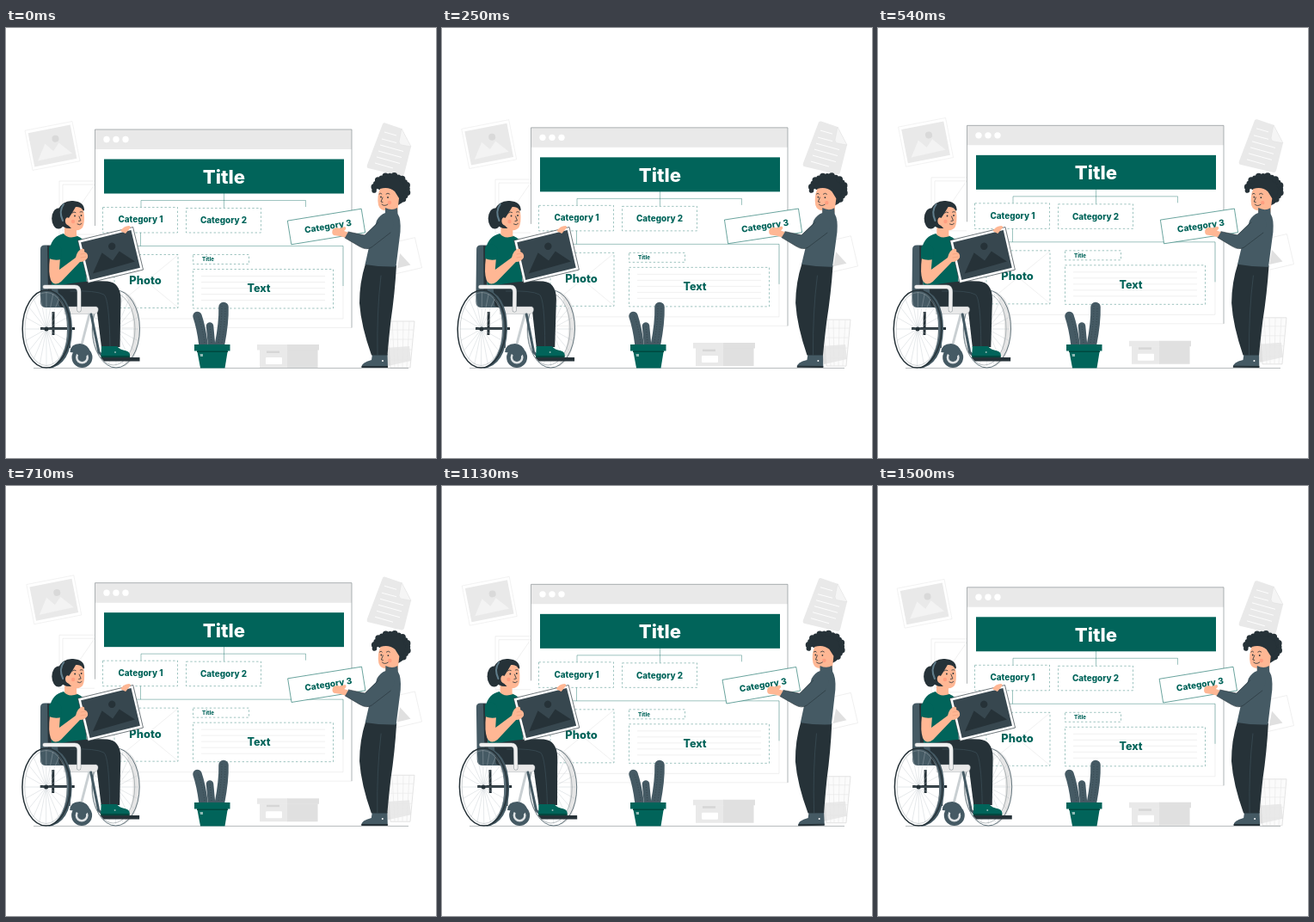
Write an HTML page that moves like this. It is 500x500 px and loops after 1.54 s.

```html
<!DOCTYPE html>
<html lang="en">
<head>
<meta charset="utf-8">
<style>
html, body { margin: 0; height: 100%; overflow: hidden; background: #fff; }
svg { display: block; width: 100vw; height: 100vh; }
text { font-family: Inter, "Open Sans", sans-serif; font-weight: 800; text-anchor: middle; fill: #01645a; }
.green { fill: #01645a; }
.dark { fill: #263238; }
.slate { fill: #455a64; }
.skin { fill: #ffb794; }
.white { fill: #fff; }
.pale { fill: #e9e9e9; }
.grey { fill: #e0e0e0; }
.line { fill: none; stroke: #263238; stroke-width: .5; }
.thin { fill: none; stroke: #e6e6e6; stroke-width: .6; }
.teal { fill: none; stroke: #01645a; stroke-width: .55; stroke-opacity: .7; }
.dash { stroke-dasharray: 2.4 2.4; }
.round { fill: none; stroke-linecap: round; stroke-linejoin: round; }
</style>
</head>
<body>
<svg viewBox="0 0 500 500">
  <g id="backdrop">
    <path class="thin" d="M103 178H62V240H103M66 182H103M66 182V236M66 236L103 182"/>
    <g transform="translate(450 267) rotate(-13)">
      <rect class="thin" x="-23" y="-17" width="53" height="36"/>
      <path class="grey" d="M2 13L9-3 18 13Z"/>
    </g>
    <g id="photo">
      <g transform="translate(54 137) rotate(-11)">
        <rect x="-28" y="-23.5" width="56" height="47" fill="#fff" stroke="#ebebeb" stroke-width=".6"/>
        <rect class="pale" x="-25" y="-20" width="50" height="40"/>
        <path d="M-20 14L-8-4 0 6 8-2 21 13Z" fill="#f3f3f3"/>
        <circle cx="5" cy="-7.5" r="4" fill="#d9d9d9"/>
      </g>
    </g>
    <g id="sheet">
      <path class="pale" d="M438 111.500Q439 110 441 110.500L460 117 471 138 463 170Q462 173 459 172L421 163Q419 162 420 159Z"/>
      <path d="M460 117L457 132Q457 135 460 136L471 138Z" fill="#f5f5f5" stroke="#dedede" stroke-width=".5"/>
      <path stroke="#fff" stroke-width=".9" fill="none" d="M440 121L454 125M437 129L454 133.500M435 136L462 143.500M433 143L460 150.500M431 150L458 157.500M429 157L450 163"/>
    </g>
  </g>

  <g id="page">
    <path class="white" d="M103.500 118H402V348.500H103.500Z"/>
    <path class="thin" d="M103.500 338H392M103.500 348.500H402M392 253.500V338"/>
    <path class="pale" d="M103.500 118H402V141H103.500Z"/>
    <path d="M103.500 230V118H402V348.500" fill="none" stroke="#8b9295" stroke-width=".7"/>
    <g class="white"><circle cx="117" cy="129.500" r="3.700"/><circle cx="128" cy="129.500" r="3.700"/><circle cx="139" cy="129.500" r="3.700"/></g>
    <rect class="green" x="114" y="152.500" width="279" height="40"/>
    <path class="teal" d="M253.500 192V209M157 208V200.500H348.500V208M156.500 238V253.500M112 253.500H392V300"/>
    <path class="thin" d="M126 325L200 264M126 264L200 325M227 288.500H371M227 295.500H371M227 302.500H371M227 309.500H371M227 316.500H371"/>
    <path class="teal dash" d="M112.500 208.500H199.500V238H112.500ZM209.500 209.500H296.500V238H209.500ZM126 263.500H200V325.500H126ZM217.500 263.500H282.500V274.500H217.500ZM217.500 280.500H380.500V326H217.500Z"/>
    <text x="253.500" y="181" font-size="22.100" style="fill:#fff">Title</text>
    <text x="156.500" y="226.500" font-size="9.900">Category 1</text>
    <text x="253" y="227.300" font-size="9.900">Category 2</text>
    <text x="162" y="298" font-size="12.900">Photo</text>
    <text x="294" y="307.500" font-size="12.500">Text</text>
    <text x="235" y="271.500" font-size="6.200">Title</text>
  </g>

  <g id="props">
    <path class="pale" d="M295 374H328V395H295Z"/>
    <path class="grey" d="M327 374H362.500V395H327Z"/>
    <path class="pale" d="M292 368H328V374.500H292Z"/>
    <path class="grey" d="M327 368H364V374.500H327Z"/>
    <path d="M303 375.500H318V378H303Z" fill="#d6d6d6"/>
    <rect class="white" x="302" y="383" width="19" height="8" rx="1"/>
    <path class="grey" d="M440 372L469 370 471 387 444 393Z"/>
    <path d="M443 341H475L470 395H447Z" fill="#f5f5f5" fill-opacity=".4" stroke="#dedede" stroke-width=".8"/>
    <path class="thin" d="M449 341L452 395M455 341L456 395M462 341L461 395M469 341L466 395M443 351H474M444 362H473M445 374H472M446 386H471"/>
  </g>
  <path class="line" stroke-opacity=".65" d="M32 395.500H468"/>

  <g id="plant">
    <g class="round" stroke="#455a64">
      <path d="M229.500 368Q227 348 222.500 335" stroke-width="10.500"/>
      <path d="M248.500 368Q253.500 342 253 324.500" stroke-width="11.500"/>
      <path d="M239 368L237 346.500" stroke-width="8.500"/>
    </g>
    <path class="line" stroke-dasharray="1 2" d="M231 366Q228 346 223 334M247 366Q251 340 251 322M251 366Q255 342 255 324M239 366L237 345"/>
    <path class="green" d="M222 374H258L254.500 395.500H226Z"/>
    <path class="green" d="M219 368H260.500V375.500H219Z"/>
    <path d="M222 375.500H258V377H222Z" fill="#00483f"/>
    <path d="M225.500 379H229V382H226Z" fill="#8fb9b4"/>
  </g>

  <g id="woman">
    <g id="farWheel"></g>
    <path class="slate" d="M40 257Q40 252.500 45 252.500H52V300H67V325H46Q40 325 40 318Z"/>
    <path class="dark" d="M48 253Q53 253 53 260V305H49Z"/>
    <path class="dark" d="M40 348H80V351H40ZM53.500 330H56.500V357H53.500ZM72 332H75V372H72Z"/>

    <path class="skin" d="M68 229H82V241Q88 245 86 249L68 248Z"/>
    <path class="green" d="M67 239Q72 246 83 242Q91 245 92 252L94 299H53L52 270Q49 265 51 256Q54 242 67 239Z"/>
    <path class="dark" d="M60 300Q90 293 118 294.500Q133 296 133.500 315L132.500 371H111L106 331Q80 333 62 323Z"/>
    <path d="M75 306Q105 305 114 310Q120 315 121 370" class="round" stroke="#455a64" stroke-width=".5"/>

    <path class="pale" d="M68 324H105Q108 325 107 329 106 332.500 103 332.500H68Z" stroke="#9aa3a7" stroke-width=".4"/>
    <path class="round" stroke="#8b9599" stroke-width="5" d="M45 301H80Q85 301 85 307V328"/>
    <path class="round" stroke="#efefef" stroke-width="4" d="M45 301H80Q85 301 85 307V328"/>
    <path class="round" stroke="#c9cfd2" stroke-width="3" d="M97 333L87 372"/>
    <path class="round" stroke="#455a64" stroke-width="3" d="M99 333L108 377 116 385H153"/>
    <path class="dark" d="M110 383H155.500V387.500H114Z"/>
    <path class="green" d="M111 370H129Q132 374 140 375.500 145 377 144 382H110.500Z"/>
    <path d="M110.500 381H144V383H110.500Z" fill="#00483f"/>
    <circle cx="127" cy="377" r="1" fill="#8fb9b4"/>

    <circle class="slate" cx="88.500" cy="383" r="12"/>
    <circle cx="88.500" cy="383" r="7.500" fill="#dfe3e5"/>
    <circle class="slate" cx="88.500" cy="383" r="5"/>
    <path class="slate" d="M74.500 377Q75 367 86 367 96 368 98 377L91 384H86Q84 377 74.500 377Z"/>
    <g id="nearWheel"></g>

    <ellipse class="dark" cx="61" cy="221.500" rx="7.800" ry="12"/>
    <path class="dark" d="M60 212Q66 200 78 201 91 202 91 212L83 216 76 233Q66 234 62 226Z"/>
    <path class="skin" d="M73 221Q77 215 81 208Q88 207 90.500 214Q92 226 89 232Q85 237 77 234L73 230Q68 228 69 223 70 219 73 221Z"/>
    <path class="round" stroke="#607d8b" stroke-width="2" d="M67 205Q61 213 66 224"/>
    <path class="round" stroke="#263238" stroke-width=".8" d="M77 215Q79 213 81 214.500M86 214Q88 213 89 214M83 228Q86 230 88 227.500M85 219L87 224 84.500 224.500"/>
    <circle class="dark" cx="80" cy="218.500" r=".9"/><circle class="dark" cx="87.500" cy="218" r=".9"/>
    <circle cx="78" cy="225" r="2.200" fill="#ff9e80"/>

    <g transform="translate(121.500 264) rotate(-13.500)">
      <rect x="-33" y="-25.500" width="66" height="51" fill="#fff" stroke="#263238" stroke-width=".6"/>
      <rect x="-30" y="-22.500" width="60" height="45" fill="#37474f"/>
      <path class="dark" d="M-25 16L-9-5 1 7 11-2 26 14Z"/>
      <circle class="dark" cx="4" cy="-9.500" r="4.200"/>
    </g>
    <path class="skin" d="M133 236Q137 230 143 230 146 231 144 233L139 239Z"/>
    <path class="skin" d="M51 267H63L62 281 81 267Q83 258 89 256.500 92 257 91 260 96 262 95 267 92 272 86 272L64 295Q56 301 52 293 49 285 51 267Z"/>
    <path class="green" d="M50 255Q58 247 64 256L64.500 269Q57 271 50 268Z"/>
    <path class="round" stroke="#eb9d7b" stroke-width=".6" d="M87 263L93 262M87 267L93 266"/>
  </g>

  <g id="man">
    <path class="slate" d="M426 379H443.500L444 394.500H413.500Q413 389 425 386Z"/>
    <path class="dark" d="M413.500 393H444V395H413.500Z"/>
    <circle class="white" cx="438" cy="387" r="1"/>
    <path class="dark" d="M418 274L454 276Q452 310 447.500 340 445 362 443.500 380.500H425Q413 347 411 320 411 296 418 274Z"/>
    <path class="round" stroke="#455a64" stroke-width=".5" d="M436 288Q431 330 432 380"/>
    <g id="curls" class="dark"></g>
    <path class="skin" d="M435 187Q445 184 452 190L457 198 455 215H441V212Q435 212 433 206 431 196 435 187Z"/>
    <path class="round" stroke="#263238" stroke-width=".8" d="M434 193Q436 191 437 193M442 193Q444 191 446 193M437 205Q440 208 444 205M438 197L436 202 438 202.500"/>
    <circle class="dark" cx="436" cy="196.500" r=".9"/><circle class="dark" cx="444" cy="197" r=".9"/>
    <circle cx="446" cy="203" r="2.200" fill="#ff9e80"/>
    <path class="slate" d="M441 209Q449 213 455 209L455.500 216Q459.500 222 458.500 237L453.500 277.500Q435 278 417.500 275L422 255 431 224Q435 217 441 215Z"/>

    <g transform="translate(372.500 231) rotate(-9.200)">
      <rect x="-43.500" y="-14" width="87" height="28" fill="#fff" stroke="#01645a" stroke-width=".55"/>
      <text x="2" y="3.500" font-size="10.100">Category 3</text>
    </g>
    <path class="skin" d="M380 234Q384 231 388 233L394 231Q397 233 393 236L402 239 399 245 388 242 381 241Q378 239 380 234Z"/>
    <path class="slate" d="M398 237L417 241 432 226Q440 216 449 222 454 229 446 238L424 256Q418 258 411 254L394 244Z"/>
    <path class="round" stroke="#263238" stroke-width=".6" d="M398 237L417 241 433 226M394 244L411 254Q419 259 425 255L447 238"/>
  </g>
</svg>
<script>
const PERIOD = 1540;
const el = id => document.getElementById(id);
const move = (id, transform) => el(id).setAttribute('transform', transform);

const ring = (cx, rx, ry, color, width) =>
  `<ellipse cx="${cx}" cy="350" rx="${rx}" ry="${ry}" fill="none" stroke="${color}" stroke-width="${width}"/>`;

function spokes(cx, rx, ry) {
  let d = '';
  for (let i = 0; i < 20; i++) {
    const a = i * Math.PI / 10;
    d += `M${cx} 350L${cx + rx * Math.cos(a)} ${350 + ry * Math.sin(a)}`;
  }
  return `<path d="${d}" fill="none" stroke="#b8c0c4" stroke-width=".35"/>`;
}

el('farWheel').innerHTML =
  '<path d="M134 305Q156 312 156 350 155 388 134 395 148 380 148 350 148 320 134 305Z" fill="#e6e6e6"/>' +
  spokes(128, 26, 43) + ring(128, 27.5, 45, '#455a64', .8) + ring(125, 25, 42, '#8b9599', .6);

el('nearWheel').innerHTML = spokes(47, 25, 43) +
  '<path class="slate" d="M49 304Q76 307 77 350 76 393 49 396 71 386 71 350 71 313 49 304Z"/>' +
  ring(47, 27.8, 45, '#263238', 1.5) + ring(47, 25, 42.5, '#9aa3a7', .5) +
  '<circle class="dark" cx="47" cy="350" r="2.500"/>';

let curls = '<path d="M430 186Q434 172 448 172 464 173 466 188 466 202 456 206L451 195Q441 192 430 186Z"/>';
for (let i = 0; i < 17; i++) {
  const a = Math.PI * (.97 + i * .085);
  curls += `<circle cx="${447.5 + 19.5 * Math.cos(a)}" cy="${187.5 + 16 * Math.sin(a)}" r="${2.8 + i % 2}"/>`;
}
el('curls').innerHTML = curls;

function frame(now) {
  const turn = now % PERIOD / PERIOD;
  const sway = Math.sin(turn * 2 * Math.PI);
  const lift = Math.sin(turn * Math.PI) ** 1.3;
  move('page', `translate(0 ${-5.4 * lift})`);
  move('backdrop', `translate(0 ${-4.8 * lift})`);
  move('props', `translate(0 ${-4.8 * lift})`);
  move('photo', `translate(${1.8 * lift} 0)`);
  move('woman', `translate(0 265) skewX(${-.8 * sway}) translate(0 -265)`);
  move('man', `rotate(${.7 * sway} 432 330)`);
  requestAnimationFrame(frame);
}
frame(performance.now());
</script>
</body>
</html>
```
